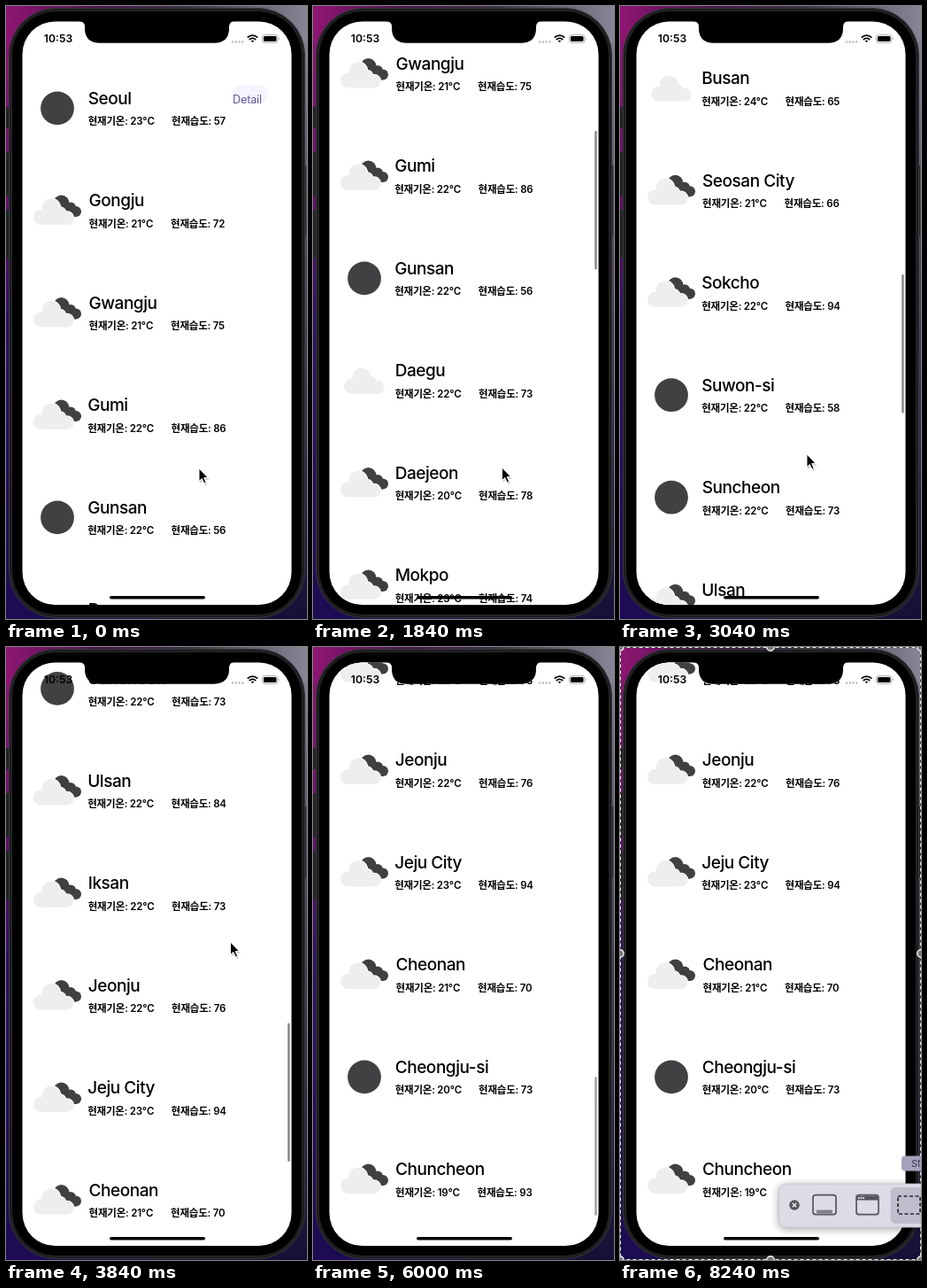
Write an HTML page that moves like this. It is 340x692 px and loops after 8.32 s.

```html
<!DOCTYPE html>
<html lang="ko">
<head>
<meta charset="utf-8">
<title>Weather list</title>
<style>
html, body { margin: 0; width: 100%; height: 100%; overflow: hidden; background: #160b35; }
svg { display: block; width: 340px; height: 692px; font-family: Inter, 'Noto Sans CJK KR', 'Noto Sans CJK', sans-serif; }
.city { font-size: 19px; font-weight: 500; letter-spacing: -.45px; }
.info { font-size: 11.5px; font-weight: 600; letter-spacing: -.2px; }
.panel { filter: drop-shadow(0 2px 5px rgba(0, 0, 0, .35)); }
</style>
</head>
<body>
<svg viewBox="0 0 340 692">
  <defs>
    <linearGradient id="top">
      <stop offset="0" stop-color="#8f1673"/><stop offset=".3" stop-color="#4b1250"/>
      <stop offset=".6" stop-color="#38303f"/><stop offset="1" stop-color="#888696"/>
    </linearGradient>
    <linearGradient id="left" x2="0" y2="1">
      <stop offset="0" stop-color="#8f1673"/><stop offset=".3" stop-color="#671267"/>
      <stop offset=".5" stop-color="#321068"/><stop offset="1" stop-color="#1c0b52"/>
    </linearGradient>
    <linearGradient id="right" x2="0" y2="1">
      <stop offset="0" stop-color="#888696"/><stop offset=".4" stop-color="#53485f"/>
      <stop offset="1" stop-color="#141036"/>
    </linearGradient>
    <clipPath id="screen"><rect x="18.5" y="17.5" width="304" height="658.5" rx="37"/></clipPath>
    <g id="cloud">
      <circle cx="39.5" cy="19" r="8.5"/><circle cx="51" cy="8.5" r="10.5"/>
      <circle cx="61" cy="14" r="6.5"/><circle cx="69" cy="20" r="7.5"/>
      <path d="M39.5 27.5V14L44 8H60L69 14V27.5Z"/>
    </g>
    <g id="clear"><circle cx="58" cy="11.4" r="18.9" fill="#414143"/></g>
    <g id="few"><use href="#cloud" x="4" y="-1" fill="#eee"/></g>
    <g id="broken">
      <g fill="#404042">
        <circle cx="62.5" cy="3" r="9"/><circle cx="73" cy="8" r="6"/>
        <circle cx="79" cy="12.5" r="6"/><circle cx="69" cy="10.5" r="7.5"/>
        <rect x="66" y="10" width="13" height="8.5"/>
      </g>
      <use href="#cloud" fill="#fff" stroke="#fff" stroke-width="1.6"/>
      <use href="#cloud" fill="#eee"/>
    </g>
  </defs>

  <rect width="340" height="692" fill="url(#left)"/>
  <rect x="170" width="170" height="692" fill="url(#right)"/>
  <rect width="340" height="40" fill="url(#top)"/>
  <g fill="#242427">
    <rect y="114" width="5" height="24"/>
    <rect y="165" width="5" height="50"/>
    <rect y="230" width="5" height="55"/>
    <rect x="335" y="180" width="4" height="80"/>
  </g>
  <rect x="3.5" y="2.5" width="334" height="688" rx="53" fill="#1d1d1f" stroke="#38383b"/>
  <rect x="6.5" y="5.5" width="328" height="682" rx="50" stroke="#2a2a2d"/>

  <g clip-path="url(#screen)">
    <rect x="18" y="17" width="305" height="660" fill="#fff"/>
    <g id="list"></g>
    <rect id="bar" x="318.2" width="2.5" rx="1.25" fill="#888"/>
  </g>
  <path d="M82 17Q89 17 89 23.5V25Q89 41.7 106 41.7H235Q252 41.7 252 25V23.5Q252 17 259 17Z"/>

  <text x="59" y="41.3" text-anchor="middle" font-size="12.2" font-weight="600">10:53</text>
  <g fill="#bbb">
    <circle cx="256" cy="40.5" r="1.2"/><circle cx="259.8" cy="40.5" r="1.2"/>
    <circle cx="263.5" cy="40.5" r="1.2"/><circle cx="267.2" cy="40.5" r="1.2"/>
  </g>
  <g fill="none" stroke="#000" stroke-width="1.8">
    <path d="M272.7 35.7Q278.5 30.5 284.3 35.7M274.8 38Q278.5 34.7 282.2 38"/>
    <path d="M278.5 41.3l-1.7-2q1.7-1.3 3.4 0z" fill="#000" stroke="none"/>
  </g>
  <rect x="289.5" y="32.6" width="17.4" height="8.8" rx="2.6" fill="none" stroke="#999" stroke-width=".8"/>
  <rect x="290.9" y="34" width="14.6" height="6" rx="1.5"/>
  <path d="M308 35.5q1.6 1.5 0 3z" fill="#999"/>
  <rect x="117" y="666" width="108" height="3.6" rx="1.8"/>

  <g id="cursor">
    <path d="M1 2v15l3.4-3.2 2.7 5.4 2.4-1.1-2.5-5.2h4.8z" fill="#000" opacity=".18"/>
    <path d="M0 0V14.5L3.3 11.5 5.8 17 8.1 16 5.7 10.6H10.2Z" stroke="#fff" stroke-width="1"/>
  </g>

  <g id="capture">
    <rect x=".5" y=".5" width="339" height="691" fill="none" stroke="#333"/>
    <rect x=".5" y=".5" width="339" height="691" fill="none" stroke="#eee" stroke-dasharray="4 3"/>
    <g id="handles" fill="#77757c" stroke="#f2f2f2" stroke-width="1.4"></g>
    <rect class="panel" x="179.5" y="606" width="180" height="49" rx="8" fill="#dedae6" stroke="#c4c0cc" stroke-width=".8"/>
    <rect x="305.5" y="610" width="50" height="41" rx="6" fill="#c2bdcc"/>
    <circle cx="197" cy="630" r="5.8" fill="#57545d"/>
    <path d="M194.8 627.8l4.4 4.4m0-4.4l-4.4 4.4" stroke="#eee" stroke-width="1.4"/>
    <g fill="none" stroke="#57545d" stroke-width="1.7">
      <rect x="218" y="618.7" width="26" height="22" rx="3"/>
      <rect x="267" y="618.7" width="25" height="22" rx="3"/>
      <path d="M267.5 622h24" stroke-width="5"/>
      <path d="M222 637.5h18" stroke="#827e8a" stroke-width="4"/>
      <path d="M269 622h7" stroke="#dedae6" stroke-width="1.8" stroke-dasharray="1.8 .9"/>
      <rect x="314" y="620" width="25" height="20" stroke="#29272e" stroke-dasharray="4 2.5"/>
    </g>
    <g id="tip">
      <rect x="318" y="574.5" width="40" height="17" rx="4" fill="#a8a2bd"/>
      <text x="329" y="587" font-size="11" fill="#3f3b4e">Stop</text>
    </g>
  </g>
</svg>
<script>
const LOOP = 8320, STEP = 80, PITCH = 115.5, END = 1709;
const $ = id => document.getElementById(id);

// city, temperature, humidity, icon
const rows = [
  ['Seoul', 23, 57, 'clear'], ['Gongju', 21, 72, 'broken'], ['Gwangju', 21, 75, 'broken'],
  ['Gumi', 22, 86, 'broken'], ['Gunsan', 22, 56, 'clear'], ['Daegu', 22, 73, 'few'],
  ['Daejeon', 20, 78, 'broken'], ['Mokpo', 23, 74, 'broken'], ['Busan', 24, 65, 'few'],
  ['Seosan City', 21, 66, 'broken'], ['Sokcho', 22, 94, 'broken'], ['Suwon-si', 22, 58, 'clear'],
  ['Suncheon', 22, 73, 'clear'], ['Ulsan', 22, 84, 'broken'], ['Iksan', 22, 73, 'broken'],
  ['Jeonju', 22, 76, 'broken'], ['Jeju City', 23, 94, 'broken'], ['Cheonan', 21, 70, 'broken'],
  ['Cheongju-si', 20, 73, 'clear'], ['Chuncheon', 19, 93, 'broken']
];

// rows are centred, so narrow digits push the left edge inwards
$('list').innerHTML = rows.map(([city, temp, hum, icon], i) => {
  const one = /1/.test(temp), seven = /7/.test(hum);
  const x = 92.2 + .8 * one + .5 * seven;
  return `<g transform="translate(0 ${104 + i * PITCH})"><use href="#${icon}"/>
    <text class="city" x="${x}" y="6.8">${city}</text>
    <text class="info" x="${x}" y="30.3">현재기온: ${temp}°C</text>
    <text class="info" x="${x + 94.3 - 1.7 * one}" y="30.3">현재습도: ${hum}</text>
    ${i ? '' : `<rect x="255" y="-14" width="41" height="20" rx="9" fill="#f6f4fd"/>
    <text x="256" y="6.3" font-size="12.7" letter-spacing="-.2" fill="#605a94">Detail</text>`}</g>`;
}).join('');

$('handles').innerHTML = [0, 170, 340].flatMap(x => [0, 346, 692].map(y =>
  x === 170 && y === 346 ? '' : `<circle cx="${x}" cy="${y}" r="4.2"/>`)).join('');

const scrollKeys = [[0, 0], [960, 0], [1840, 270], [3040, 946.7], [3840, 1454.5],
  [4400, 1714.5], [4640, 1721], [5280, END], [LOOP, END]];
const cursorX = [[0, 218], [1840, 213.5], [3040, 211], [3840, 253.5], [4400, 251], [5600, 350]];
const cursorY = [[0, 522], [1840, 521], [3040, 506], [3840, 333], [4400, 365], [5600, 420]];

// monotone cubic through [time, value] points
function curve(keys, t) {
  const slope = i => keys[i + 1] && keys[i]
    ? (keys[i + 1][1] - keys[i][1]) / (keys[i + 1][0] - keys[i][0]) : 0;
  const tangent = i => {
    const a = slope(i - 1), b = slope(i);
    return a * b > 0 ? 2 * a * b / (a + b) : 0;
  };
  const last = keys.length - 1;
  if (t >= keys[last][0]) return keys[last][1];
  const i = keys.findIndex(k => k[0] > t) - 1;
  const [t0, v0] = keys[i], [t1, v1] = keys[i + 1], d = t1 - t0, u = (t - t0) / d;
  return v0 + (v1 - v0) * u * u * (3 - 2 * u)
    + d * u * (1 - u) * (tangent(i) * (1 - u) - tangent(i + 1) * u);
}

const clamp = v => Math.max(0, Math.min(1, v));
const show = (id, on) => $(id).setAttribute('visibility', on ? 'visible' : 'hidden');

function draw(t) {
  const y = curve(scrollKeys, t), over = Math.max(0, y - END);
  $('list').setAttribute('transform', `translate(0 ${-y})`);
  $('bar').setAttribute('y', 76.4 + Math.min(y, END) * .2393 + over);
  $('bar').setAttribute('height', 156.5 - over);
  $('bar').setAttribute('opacity', t > 960 ? clamp((6320 - t) / 400) : 0);
  $('cursor').setAttribute('transform', `translate(${curve(cursorX, t)} ${curve(cursorY, t)})`);
  show('cursor', t < 5600);
  show('capture', t >= 7520);
  show('tip', t >= 8000);
}

const start = performance.now();
function tick() {
  const t = (performance.now() - start) % LOOP;
  draw(Math.floor(t / STEP) * STEP);
  requestAnimationFrame(tick);
}
tick();
</script>
</body>
</html>
```
